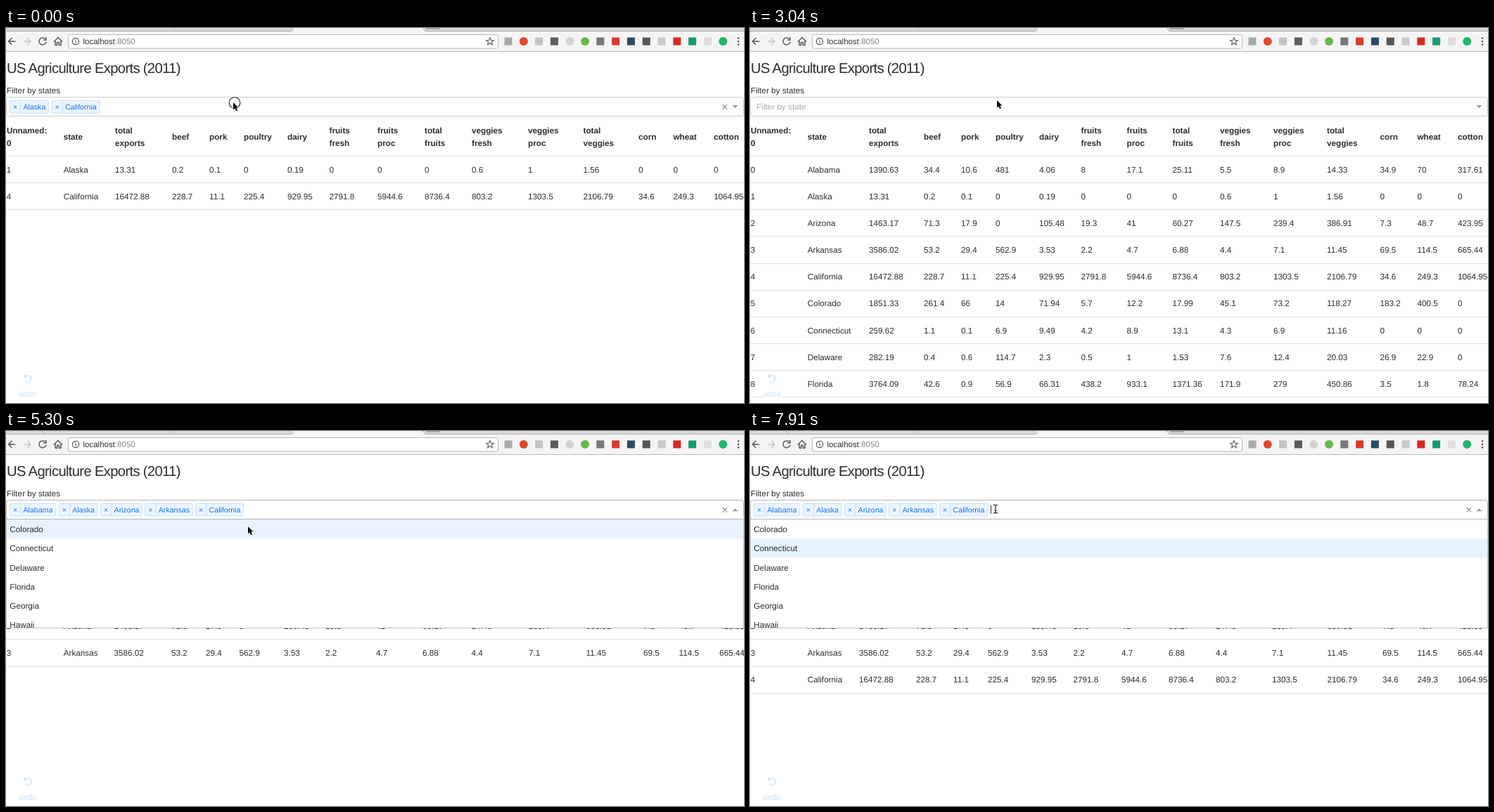
Write an HTML page that moves like this. It is 1049 px wide and 534 px high and loops after 8000 ms.

```html
<!DOCTYPE html>
<html lang="en">
<head>
<meta charset="utf-8">
<title>US Agriculture Exports</title>
<style>
html, body { margin: 0; width: 100%; height: 100%; overflow: hidden; background: #fff; }
svg { display: block; width: 100%; height: 100%; }
text { font: 11.72px "Liberation Sans", Arial, sans-serif; fill: #2d2d2d; text-rendering: geometricPrecision; white-space: pre; }
.head { font-weight: bold; }
.title { font-size: 20.3px; letter-spacing: -.69px; }
.url { font-size: 11.5px; }
.soft { fill: #aaa; }
.tag { font-size: 10.6px; fill: #1673f0; }
.undo { fill: #cbe0f2; }
.line { fill: none; stroke: #5a5a5a; stroke-width: 1.5; }
</style>
</head>
<body>
<svg viewBox="0 0 1049 534" preserveAspectRatio="none">
  <g id="table"></g>
  <g id="page">
    <text class="title" x="1" y="64">US Agriculture Exports (2011)</text>
    <text x="1" y="92.7">Filter by states</text>
    <rect x="17" y="488.5" width="28" height="38" fill="#fff" opacity=".8"/>
    <path d="M27.2 496.2A5 5 0 1 1 27.6 503.2M26.6 493.6V497H30" fill="none" stroke="#cbe0f2" stroke-width="1.2"/>
    <text class="undo" x="17.8" y="525.2">undo</text>
  </g>
  <g id="chrome">
    <rect width="1049" height="33" fill="#f4f4f4"/>
    <path d="M0 0H405L409 4.5H0ZM592 0H1049V4.5H596Z" fill="#d9d9d9"/>
    <path d="M0 4.5H405L408 0M592 0L596 4.5H1049M51 0L54 4M240 0L237 4" fill="none" stroke="#b0b0b0"/>
    <path d="M597 1H617" stroke="#999" stroke-width="1.5"/>
    <path d="M0 33.5H1049" stroke="#b9b9b9"/>
    <rect x="88.5" y="9.5" width="611" height="19.5" rx="3" fill="#fff" stroke="#b8b8b8"/>
    <path class="line" d="M13.5 19H4M8.5 14L3.5 19L8.5 24"/>
    <path class="line" style="stroke:#c9c9c9" d="M25 19H34.5M30 14L35 19L30 24"/>
    <path class="line" d="M55.8 15.6A5 5 0 1 0 57 19.6M57 13V17H53"/>
    <path class="line" d="M68 19.5L74 13.5L80 19.5M70 18.5V24.3H72.6V20.5H75.4V24.3H78V18.5"/>
    <circle class="line" cx="99" cy="19" r="4.7" style="stroke-width:1.2"/>
    <path class="line" style="stroke-width:1.2" d="M99 18V21.8M99 15.7V17"/>
    <text class="url" x="109.5" y="23">localhost<tspan fill="#888">:8050</tspan></text>
    <path class="line" style="stroke-width:1.1" d="M688 13.6L689.5 17.2L693.3 17.5L690.4 20L691.3 23.8L688 21.7L684.7 23.8L685.6 20L682.7 17.5L686.5 17.2Z"/>
    <g fill="#555"><circle cx="1041" cy="14.5" r="1.3"/><circle cx="1041" cy="19" r="1.3"/><circle cx="1041" cy="23.5" r="1.3"/></g>
  </g>
  <g id="filter"></g>
  <g id="pointer"></g>
</svg>
<script>
const LOOP = 8000;
const $ = id => document.getElementById(id);

const STATES = "Alabama Alaska Arizona Arkansas California Colorado Connecticut Delaware Florida Georgia Hawaii Idaho".split(" ");
const TAG_STEP = [69.7, 59.4, 63.2, 71.8, 72.8, 72];
const HEADS = ["total exports", "beef", "pork", "poultry", "dairy", "fruits fresh", "fruits proc", "total fruits",
  "veggies fresh", "veggies proc", "total veggies", "corn", "wheat", "cotton"];
const DATA = `1390.63 34.4 10.6 481 4.06 8 17.1 25.11 5.5 8.9 14.33 34.9 70 317.61
13.31 0.2 0.1 0 0.19 0 0 0 0.6 1 1.56 0 0 0
1463.17 71.3 17.9 0 105.48 19.3 41 60.27 147.5 239.4 386.91 7.3 48.7 423.95
3586.02 53.2 29.4 562.9 3.53 2.2 4.7 6.88 4.4 7.1 11.45 69.5 114.5 665.44
16472.88 228.7 11.1 225.4 929.95 2791.8 5944.6 8736.4 803.2 1303.5 2106.79 34.6 249.3 1064.95
1851.33 261.4 66 14 71.94 5.7 12.2 17.99 45.1 73.2 118.27 183.2 400.5 0
259.62 1.1 0.1 6.9 9.49 4.2 8.9 13.1 4.3 6.9 11.16 0 0 0
282.19 0.4 0.6 114.7 2.3 0.5 1 1.53 7.6 12.4 20.03 26.9 22.9 0
3764.09 42.6 0.9 56.9 66.31 438.2 933.1 1371.36 171.9 279 450.86 3.5 1.8 78.24`
  .split("\n").map(row => row.split(" "));

// Left edges of the number columns for each table width
const COLS = {
  few: [153.5, 235, 284, 331.5, 395, 454, 526, 592, 661.5, 743, 824.5, 906, 956.5, 1014],
  mid: [155, 236, 289, 338, 400, 459.5, 528, 595, 662, 742, 820.5, 899, 948.5, 1006],
  six: [155, 235, 288, 337, 399.5, 458.5, 526.5, 592.5, 659.5, 739.5, 817.5, 895.5, 948.5, 1006],
  all: [169, 247, 300, 349, 411, 470.5, 535.5, 600.5, 668, 744, 820, 895.5, 948.5, 1006]
};

// Each step changes only what it names; tags and rows are strings of state indexes
const STEPS = [
  { t: 0, tags: "14", rows: "14", cols: "mid", open: 0, focus: 0, caret: 0, cur: "arrow", x: 323, y: 106, ring: 1, ghost: 0 },
  { t: 120, ring: 0 },
  { t: 390, cur: "beam", x: 325, y: 107 },
  { t: 510, open: 1 },
  { t: 990, tags: "1", rows: "1", cur: "none" },
  { t: 1470, tags: "", caret: 1 },
  { t: 1710, rows: "012345678", cols: "all" },
  { t: 1980, cur: "arrow", x: 354, y: 98, caret: 0 },
  { t: 2090, x: 380, y: 84 },
  { t: 2330, x: 382, y: 76 },
  { t: 2450, open: 0 },
  { t: 2570, x: 381, y: 78 },
  { t: 2690, x: 376, y: 83 },
  { t: 2810, x: 366, y: 92 },
  { t: 2930, x: 356, y: 99 },
  { t: 3040, x: 351, y: 103 },
  { t: 3270, open: 1 },
  { t: 3390, x: 349, y: 112 },
  { t: 3510, x: 346, y: 126 },
  { t: 3630, x: 344, y: 136 },
  { t: 3750, tags: "0" },
  { t: 3980, rows: "0", cols: "few" },
  { t: 4360, tags: "01" },
  { t: 4480, rows: "01" },
  { t: 4710, tags: "012" },
  { t: 4830, rows: "012" },
  { t: 5060, tags: "0123" },
  { t: 5180, rows: "0123" },
  { t: 5300, tags: "01234" },
  { t: 5420, rows: "01234", cols: "mid" },
  { t: 5540, tags: "012345" },
  { t: 5660, rows: "012345", cols: "six" },
  { t: 5780, x: 403, y: 92 },
  { t: 5900, x: 425, y: 74 },
  { t: 6020, x: 440, y: 65 },
  { t: 6250, x: 433, y: 58 },
  { t: 6370, x: 420, y: 65, open: 0 },
  { t: 6840, x: 405, y: 70, ghost: 1 },
  { t: 6960, x: 400, y: 78, ghost: 0 },
  { t: 7080, x: 391, y: 86 },
  { t: 7200, x: 376, y: 93 },
  { t: 7320, x: 362, y: 99 },
  { t: 7430, cur: "beam", x: 352, y: 109 },
  { t: 7550, x: 349, y: 111 },
  { t: 7790, tags: "01234", open: 1, focus: 1, caret: 1 },
  { t: 7910, rows: "01234", cols: "mid" }
];
for (let i = 1; i < STEPS.length; i++) STEPS[i] = { ...STEPS[i - 1], ...STEPS[i] };

const text = (s, x, y, cls = "") => `<text class="${cls}" x="${x}" y="${y}">${s}</text>`;
const path = (d, attrs) => `<path d="${d}" ${attrs}/>`;
const rect = (x, y, w, h, attrs) => `<rect x="${x}" y="${y}" width="${w}" height="${h}" ${attrs}/>`;

function head(label, x) {
  const words = label.split(" ");
  return words.length < 2 ? text(label, x, 159.2, "head")
    : text(words[0], x, 149.7, "head") + text(words[1], x, 168.2, "head");
}

const rule = y => path(`M0 ${Math.floor(y) + .5}H1049`, 'stroke="#e1e1e1"');

function table({ rows, cols }) {
  const xs = COLS[cols];
  let out = head("Unnamed: 0", 1) + head("state", 81.7) + HEADS.map((h, i) => head(h, xs[i])).join("") + rule(182);
  [...rows].forEach((r, i) => {
    const y = 205.8 + i * 38.13;
    out += text(r, .7, y) + text(STATES[r], 81.7, y);
    out += DATA[r].map((v, c) => text(v, xs[c], y)).join("") + rule(y + 14.9);
  });
  return out;
}

function tag(i, x) {
  return rect(x + .5, 103.5, TAG_STEP[i] - 4.5, 17.5, 'rx="1.5" fill="#ebf5ff" stroke="#c2e0ff"')
    + path(`M${x + 15.8} 104V121`, 'stroke="#c2e0ff"')
    + text("×", x + 5, 115.7, "tag") + text(STATES[i], x + 19.5, 116, "tag");
}

function filter({ tags, open, focus, caret }) {
  const edge = open ? "#b5b5b5" : "#ccc";
  let out = "";
  if (open) {
    out += rect(.5, 125.5, 1048, 155, 'fill="#fff" stroke="#c4c4c4"');
    out += rect(1, 126 + focus * 27.25, 1047, 27.25, 'fill="#e7f2fd"');
    STATES.filter((s, i) => !tags.includes(i)).slice(0, 6)
      .forEach((s, i) => { out += text(s, 5.3, 144 + i * 27.25); });
  }
  out += rect(.5, 98.5, 1048, 27, `rx="3" fill="#fff" stroke="${edge}"`);
  let x = 5;
  for (const i of tags) {
    out += tag(i, x);
    x += TAG_STEP[i];
  }
  if (!tags) out += text("Filter by state", 9.2, 116.2, "soft");
  else out += path("M1018.5 109L1025 115.5M1025 109L1018.5 115.5", 'stroke="#999" stroke-width="1.4"');
  out += path(open ? "M1032.5 114.2H1040.5L1036.5 110.2Z" : "M1032.5 110H1040.5L1036.5 114Z", 'fill="#999"');
  if (caret) out += path(`M${Math.round(tags ? x : 9) + .5} 105.5V118`, 'stroke="#333"');
  return out;
}

const arrow = (x, y) => path("M0 0V10.4L2.4 8.2L4.1 12L6 11.2L4.3 7.5H7.5Z",
  `transform="translate(${x} ${y})" stroke="#fff" stroke-width="1.6" paint-order="stroke"`);

const beam = (x, y) => ['stroke="#fff" stroke-width="2.6"', 'stroke="#111" stroke-width="1.1"'].map(s =>
  path("M-3 -6Q0 -6 0 -4Q0 -6 3 -6M0 -4V4M-3 6Q0 6 0 4Q0 6 3 6M-1.5 2H1.5", `transform="translate(${x} ${y})" fill="none" ${s}`)).join("");

function pointer({ cur, x, y, ring, ghost }) {
  let out = ring ? '<circle cx="325" cy="106.5" r="7.8" fill="none" stroke="#222" stroke-width="1.1"/>' : "";
  if (ghost) out += arrow(420, 65);
  if (cur === "arrow") out += arrow(x, y);
  if (cur === "beam") out += beam(x, y);
  return out;
}

// Toolbar buttons: round ones have a trailing "o"
$("chrome").innerHTML += "#a9a9a9 #e0492fo #c4c4c4 #5c5c5c #d2d2d2o #68b84ao #777777 #d63b2c #2b4a63 #555555 #c9c9c9 #d42a24 #159a70 #dedede #1eb66ao"
  .split(" ").map((c, i) => {
    const x = 714 + i * 21.8, fill = `fill="${c.slice(0, 7)}"`;
    return c.endsWith("o") ? `<circle cx="${x}" cy="19" r="6" ${fill}/>` : rect(x - 5.5, 13.5, 11, 11, fill);
  }).join("");

const PARTS = { table, filter, pointer };
const shown = {};

function frame() {
  const t = performance.now() % LOOP;
  const step = STEPS.findLast(s => s.t <= t);
  if (step !== shown.step) {
    shown.step = step;
    for (const id in PARTS) {
      const markup = PARTS[id](step);
      if (shown[id] !== markup) $(id).innerHTML = shown[id] = markup;
    }
  }
  requestAnimationFrame(frame);
}
frame();
</script>
</body>
</html>
```
